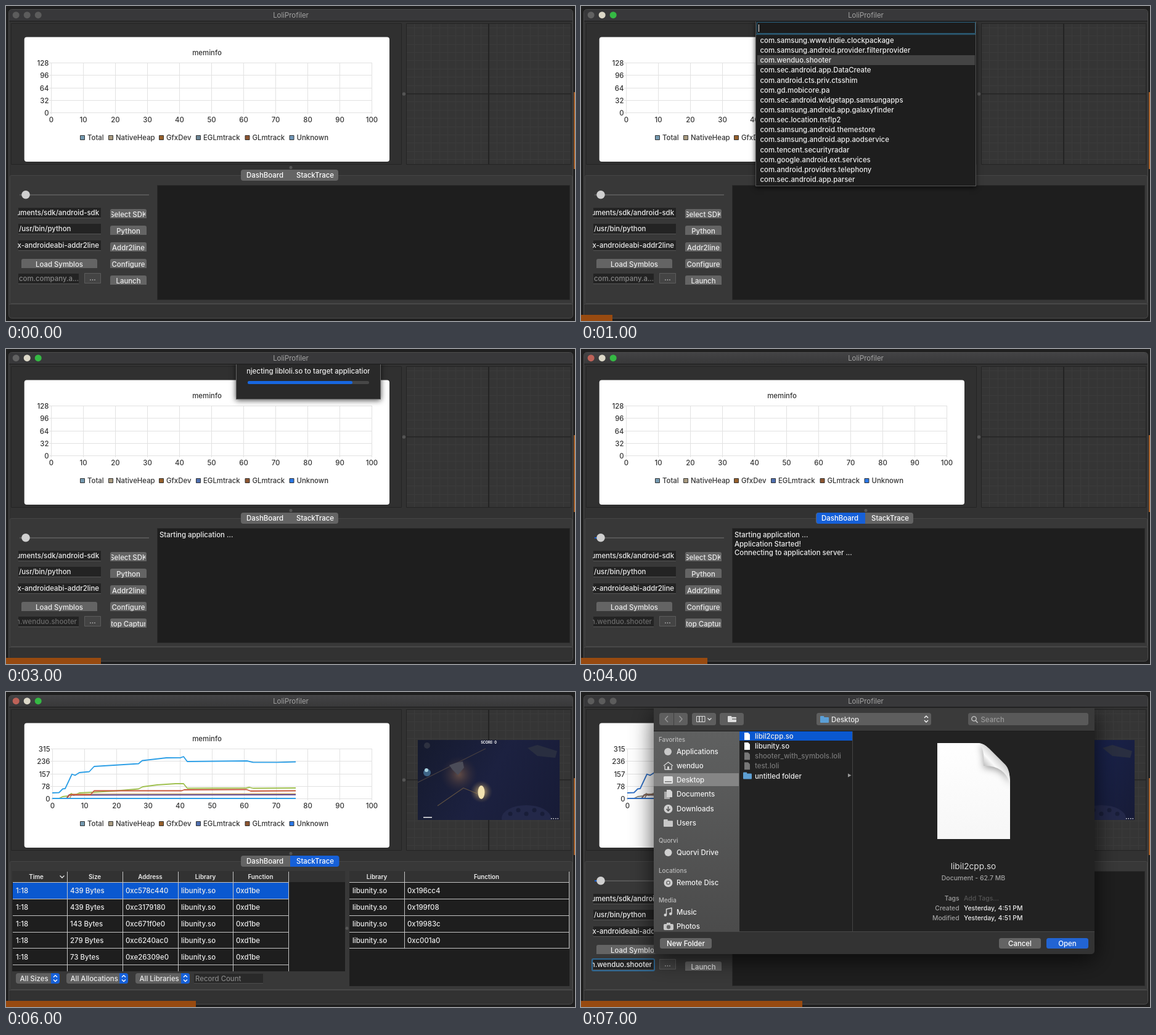
Write an HTML page with a canvas that moves like this. It is 923 px wide and 512 px high and loops after 8000 ms.

```html
<!DOCTYPE html>
<html lang="en">
<head>
<meta charset="utf-8">
<title>Memory profiler session</title>
<style>
html, body { margin: 0; width: 100%; height: 100%; overflow: hidden; background: #202020; }
canvas { display: block; }
</style>
</head>
<body>
<canvas id="stage" width="923" height="512"></canvas>
<script>
const ctx = document.getElementById('stage').getContext('2d');
const BLUE = '#1660d8', ROW_BLUE = '#0a58d0', LIGHT = '#ececec', DARK = '#1e1e1e', GREY = '#646464';
const PACKAGE = 'com.wenduo.shooter';

function rect(x, y, w, h, fill) {
  ctx.fillStyle = fill;
  ctx.fillRect(x, y, w, h);
}
function box(x, y, w, h, r, fill, stroke) {
  ctx.beginPath();
  ctx.roundRect(x, y, w, h, r);
  if (fill) { ctx.fillStyle = fill; ctx.fill(); }
  if (stroke) { ctx.strokeStyle = stroke; ctx.lineWidth = 1; ctx.stroke(); }
}
function ellipse(x, y, rx, ry, fill) {
  ctx.beginPath();
  ctx.ellipse(x, y, rx, ry, 0, 0, 7);
  ctx.fillStyle = fill;
  ctx.fill();
}
const dot = (x, y, r, fill) => ellipse(x, y, r, r, fill);
function trace(points) {
  ctx.beginPath();
  for (let i = 0; i < points.length; i += 2) ctx.lineTo(points[i], points[i + 1]);
}
function line(points, color, width = 1) {
  trace(points);
  ctx.strokeStyle = color;
  ctx.lineWidth = width;
  ctx.lineJoin = 'round';
  ctx.stroke();
}
function shape(points, fill) {
  trace(points);
  ctx.fillStyle = fill;
  ctx.fill();
}
// y is the optical middle of the line
function text(s, x, y, color = LIGHT, align = 'left', size = 11.4, weight = 500) {
  ctx.font = `${weight} ${size}px Inter, "Open Sans", sans-serif`;
  ctx.textAlign = align;
  ctx.fillStyle = color;
  ctx.fillText(s, x, y + size * 0.36);
}
function clipped(x, y, w, h, draw) {
  ctx.save();
  ctx.beginPath();
  ctx.rect(x, y, w, h);
  ctx.clip();
  draw();
  ctx.restore();
}
function shadowed(blur, draw) {
  ctx.save();
  ctx.shadowColor = 'rgba(0,0,0,.7)';
  ctx.shadowBlur = blur;
  ctx.shadowOffsetY = blur / 4;
  draw();
  ctx.restore();
}
function gradient(x0, y0, x1, y1, ...colors) {
  const g = ctx.createLinearGradient(x0, y0, x1, y1);
  colors.forEach((c, i) => g.addColorStop(i / (colors.length - 1), c));
  return g;
}
function glow(x, y, r, inner, outer) {
  const g = ctx.createRadialGradient(x, y, 1, x, y, r);
  g.addColorStop(0, inner);
  g.addColorStop(1, outer);
  rect(x - r, y - r, 2 * r, 2 * r, g);
}

function drawWindow(s) {
  const active = s >= 4 && s < 7;
  rect(0, 0, 923, 512, '#1f1f1f');
  rect(921, 140, 2, 125, '#a9622c');
  box(4.5, 5.5, 915, 502, 5, '#323232', '#4c4c4c');
  box(5, 6, 914, 18, [5, 5, 0, 0], active ? gradient(0, 6, 0, 24, '#434345', '#383839') : '#38383a');
  rect(5, 24, 914, 1, '#1c1c1c');
  const lights = s === 0 || s === 7 ? ['#5c5c5c', '#5c5c5c', '#5c5c5c']
    : [active ? '#bd6258' : '#626262', '#dcd8c8', '#35b944'];
  lights.forEach((c, i) => dot(16.2 + 18 * i, 14.7, 5.5, c));
  text('LoliProfiler', 462, 15, '#a4a4a4', 'center', 11.4, 400);

  box(8.5, 28.5, 633, 229, 0, '#303030', '#242424');
  box(649.5, 28.5, 267, 229, 0, '#353535', '#242424');
  for (let i = -9; i < 10; i++) rect(Math.round(783 + i * 13.4), 29, 1, 228, '#3b3b3b');
  for (let i = -8; i < 9; i++) rect(650, Math.round(142 + i * 13.4), 266, 1, '#3b3b3b');
  rect(782, 29, 2, 228, '#242424');
  rect(650, 142, 266, 1.5, '#242424');
  dot(645.5, 143, 2.7, '#555');
  dot(462, 262.5, 2.5, '#555');

  box(6.5, 275.5, 912, 208, 2, '#383838', '#464646');
  rect(5, 484, 914, 1, '#4b4b4b');
  box(381, 266, 158, 18, 4, GREY);
  if (s === 4 || s === 5) box(382, 266, 79, 18, [4, 0, 0, 4], BLUE);
  if (s === 6) box(461, 266, 79.5, 18, [0, 4, 4, 0], BLUE);
  text('DashBoard', 420, 275, '#fff', 'center');
  text('StackTrace', 501.5, 275, '#fff', 'center');
}

function drawChart(s) {
  const full = s >= 5, left = full ? 75 : 73, step = (593 - left) / 10;
  box(29.7, 50.5, 592.3, 202.5, 4, '#fff');
  text('meminfo', 326, 76, '#333', 'center');
  const labels = full ? [315, 236, 157, 78, 0] : [128, 96, 64, 32, 0];
  labels.forEach((v, i) => {
    const y = Math.round(92 + 20.25 * i) + 0.5;
    line([left - 3, y, 593.5, y], '#e2e2e2');
    text(v, left - 3.5, y, '#333', 'right');
  });
  for (let i = 0; i <= 10; i++) {
    const x = Math.round(left + i * step) + 0.5;
    line([x, 92, x, 176], '#e2e2e2');
    text(i * 10, x, 184.5, '#333', 'center');
  }
  const live = s >= 2;
  [['Total', 120, '#7499b0'], ['NativeHeap', 166, '#a99b80'], ['GfxDev', 248, '#96602c'],
   ['EGLmtrack', 308, live ? '#5070b0' : '#6d8797'], ['GLmtrack', 387.5, '#8d5530'],
   ['Unknown', 459.5, live ? '#2a78e8' : '#6f96b8']].forEach(([name, x, c]) => {
    box(x + 0.5, 210.5, 7, 7, 0, c, '#333');
    text(name, x + 12, 214, '#333');
  });
  if (!full) return;
  const dim = s === 7;
  line([75, 173, 86, 173, 92, 170, 101, 169, 106, 165, 110, 168, 119, 164, 140, 163, 175, 161, 215, 157.5,
    222, 154, 245, 151, 275, 149, 288, 149, 294, 156.5, 390, 156, 395, 155, 401, 156.5, 470, 156],
    dim ? '#8f8c80' : '#9fc04f', 1.8);
  line([75, 173, 103, 173, 107, 166, 470, 165.5], dim ? '#8a7460' : '#c9a25c', 1.6);
  line([75, 173, 98, 173, 102, 167.5, 470, 167], dim ? '#666a80' : '#65529a', 1.8);
  line([75, 173, 99, 173, 103, 167, 137, 167, 143, 160.5, 285, 160.5, 289, 159, 390, 158.5, 397, 161, 470, 160.5],
    dim ? '#86685a' : '#c8583e', 1.8);
  const blue = dim ? '#2e6fc6' : '#2d9fe6';
  line([75, 173, 470, 173], blue, 1.8);
  line([75, 164, 86, 163.5, 92, 157.5, 96, 157, 107, 133.5, 112, 135.5, 119, 131, 135, 129.5, 143, 121,
    215, 116.5, 221, 111.5, 260, 107, 283, 106.8, 288, 105, 294, 113, 340, 112.5, 391, 112, 401, 114.3,
    440, 114.3, 470, 113.5], blue, 1.8);
}

function drawScreenshot(s) {
  clipped(668, 78, 230, 130, () => {
    rect(668, 78, 230, 130, gradient(668, 78, 898, 208, '#151a2e', s === 7 ? '#19234e' : '#1c2140', '#171b36'));
    glow(735, 134, 30, '#5f4a45', 'rgba(50,43,55,0)');
    line([668, 147, 718, 122, 778, 92], '#463f40', 1.2);
    line([700, 185, 742, 156, 764, 165], '#5e5041', 1.2);
    shape([719, 119, 730, 115, 741, 113, 743, 123, 733, 135, 724, 126], '#4b4c58');
    shape([846, 91, 862, 86, 894, 96, 891, 107, 862, 104], '#292e40');
    dot(683, 87, 5, '#2d3140');
    dot(683, 131, 6, '#3d6486');
    dot(682, 127, 3, '#a7d1df');
    glow(771, 162, 18, 'rgba(235,200,130,.8)', 'rgba(120,100,70,0)');
    ellipse(771, 163, 5.5, 11, '#f2e2b0');
    ellipse(844, 205, 40, 21, '#232849');
    for (let i = 0; i < 5; i++) dot(818 + i * 13, 198 - (i % 2) * 6, 3.5, '#181d38');
    rect(677, 203, 14, 1.5, '#eee');
    for (let i = 0; i < 4; i++) rect(884 + i * 3.5, 205, 1.5, 1.5, '#ddd');
    text('SCORE: 0', 783, 82, '#fff', 'center', 5.5, 700);
  });
}

function field(x, y, w, value, color, right) {
  box(x, y, w, 17, 0, '#232323');
  rect(x, y + 16, w, 1, '#555');
  clipped(x - 1, y, w, 17, () =>
    text(value, right ? x + w - 3 : x + 1, y + 8, color, right ? 'right' : 'left'));
}
function cutButton(x, y, w, label) {
  clipped(x, y, w, 15, () => {
    box(x, y, w, 19, 3, GREY);
    clipped(x + 2, y, w - 4, 15, () => text(label, x + w / 2, y + 9.2, LIGHT, 'center'));
  });
}

function drawDashboard(s) {
  rect(22, 306, 210, 2, '#565656');
  if (s >= 4) rect(22, 306, 5, 2, BLUE);
  dot(32, 306.8, 6.8, '#cfcfcf');
  field(20, 328, 134, '/Documents/sdk/android-sdk', LIGHT, true);
  field(20, 354, 134, '/usr/bin/python', LIGHT);
  field(20, 381, 134, 'linux-androideabi-addr2line', LIGHT, true);
  cutButton(25, 411, 123, 'Load Symblos');
  const capturing = s === 3 || s === 4;
  if (s < 2) field(20, 435, 98, 'com.company.a...', '#868686');
  else field(20, 435, 98, PACKAGE, capturing ? '#6b6b6b' : LIGHT, true);
  if (s === 7) {
    ctx.lineWidth = 2;
    ctx.strokeStyle = '#2d6793';
    ctx.beginPath();
    ctx.roundRect(18, 434, 101, 19, 2);
    ctx.stroke();
  }
  box(127.5, 434.5, 26, 16, 0, '#444', '#5c5c5c');
  text('...', 140.5, 442, '#ccc', 'center');
  ['Select SDK', 'Python', 'Addr2line', 'Configure', capturing ? 'Stop Capture' : 'Launch']
    .forEach((label, i) => cutButton(169, 330 + Math.round(i * 26.9), 59, label));

  box(245.5, 291.5, 669, 186, 0, DARK, '#2b2b2b');
  const count = s < 3 || s === 7 ? 0 : s === 3 ? 1 : s === 4 ? 3 : 6;
  ['Starting application ...', 'Application Started!', 'Connecting to application server ...',
   'Captured 189381 records.', 'Error occurred when capturing screenshot ...',
   'Error occurred when capturing screenshot ...'].slice(0, count)
    .forEach((entry, i) => text(entry, 249, 302 + i * 14.4));
}

function table(edges, bottom, headers, rows, selected) {
  const left = edges[0], right = edges[edges.length - 1], grid = '#c4c4c4';
  headers.forEach((h, i) => {
    text(h, (edges[i] + edges[i + 1]) / 2 - (h === 'Time' ? 6 : 0), 300, LIGHT, 'center', 9.8, 600);
  });
  if (selected) rect(left, 310, right - left, 26, ROW_BLUE);
  rect(left, 309, right - left, 1, grid);
  rows.forEach((row, r) => {
    const y = 310 + r * 26.8;
    row.forEach((cell, i) => text(cell, edges[i] + 5, y + 13.2));
    rect(left, Math.round(y + 26), right - left, 1, grid);
  });
  const end = Math.min(bottom, 310 + rows.length * 26.8);
  edges.slice(1).forEach(x => rect(x, 292, 1, (selected ? bottom : end) - 292, grid));
}

function arrows(x, y) {
  line([x - 3, y - 2, x, y - 5, x + 3, y - 2], '#fff', 1.3);
  line([x - 3, y + 2, x, y + 5, x + 3, y + 2], '#fff', 1.3);
}

function drawStackTrace() {
  rect(10, 291, 540, 163, DARK);
  rect(10, 291, 540, 18, '#323232');
  rect(557, 291, 357, 187, DARK);
  rect(557, 291, 357, 18, '#323232');
  const allocations = [['439', '0xc578c440'], ['439', '0xc3179180'], ['143', '0xc671f0e0'],
    ['279', '0xc6240ac0'], ['73', '0xe26309e0']];
  table([11, 99, 189, 279, 368, 458], 454, ['Time', 'Size', 'Address', 'Library', 'Function'],
    allocations.map(([size, address]) => ['1:18', size + ' Bytes', address, 'libunity.so', '0xd1be']), true);
  line([87.5, 298.5, 91, 302, 94.5, 298.5], LIGHT, 1.3);
  table([557, 646, 913], 478, ['Library', 'Function'],
    ['0x196cc4', '0x199f08', '0x19983c', '0xc001a0'].map(f => ['libunity.so', f]), false);
  dot(553, 384, 2.5, '#555');
  [['All Sizes', 16, 71], ['All Allocations', 98, 100], ['All Libraries', 210, 88]].forEach(([label, x, w]) => {
    box(x, 457, w, 17, 4, '#606060');
    text(label, x + 6.5, 465.5);
    box(x + w - 14, 457, 14, 17, [0, 4, 4, 0], BLUE);
    arrows(x + w - 7, 465.5);
  });
  box(305, 458, 112, 16, 0, '#292929');
  rect(305, 473, 112, 1, '#4c4c4c');
  text('Record Count', 307, 466, '#858585');
}

function drawPicker(offset) {
  clipped(270, 25, 390, 290, () => {
    ctx.translate(0, -offset);
    shadowed(8, () => rect(283, 25, 358, 268, '#555'));
    rect(284, 25, 356, 267, DARK);
    box(285.5, 26.5, 354, 18, 0, '#1c1c1c', '#2a627f');
    rect(284, 45, 356, 2, '#294e62');
    rect(288, 30, 1, 12, LIGHT);
    rect(286, 80, 353, 16, '#444');
    ['com.samsung.www.Indie.clockpackage', 'com.samsung.android.provider.filterprovider', PACKAGE,
     'com.sec.android.app.DataCreate', 'com.android.cts.priv.ctsshim', 'com.gd.mobicore.pa',
     'com.sec.android.widgetapp.samsungapps', 'com.samsung.android.app.galaxyfinder',
     'com.sec.location.nsflp2', 'com.samsung.android.themestore', 'com.samsung.android.app.aodservice',
     'com.tencent.securityradar', 'com.google.android.ext.services', 'com.android.providers.telephony',
     'com.sec.android.app.parser'].forEach((name, i) => text(name, 290.5, 56 + i * 16.13));
  });
}

function drawInjecting() {
  clipped(360, 25, 260, 75, () => {
    shadowed(9, () => rect(373, 20, 235, 62, '#656565'));
    rect(374, 25, 233, 56, '#292929');
    clipped(391, 26, 199, 24, () => text('Injecting libloli.so to target application', 490, 36, LIGHT, 'center'));
    box(392, 52, 197, 5, 2.5, '#474747');
    box(392, 52, 170, 5, 2.5, '#1767e0');
  });
}

function folder(x, y, w, h, color) {
  box(x, y, w * 0.45, h * 0.4, 1, color);
  box(x, y + h * 0.18, w, h * 0.82, 1, color);
}
function sheetIcon(x, y, color) {
  shape([x, y, x + 6, y, x + 9, y + 3, x + 9, y + 12, x, y + 12], color);
}

const sidebarIcons = {
  Applications: y => dot(141, y, 6, '#c9c9c9'),
  wenduo: y => {
    line([134, y, 141.5, y - 6, 149, y], '#d4d4d4', 1.4);
    line([136, y, 136, y + 6, 147, y + 6, 147, y], '#d4d4d4', 1.4);
    rect(140, y + 1, 3, 5, '#d4d4d4');
  },
  Desktop: y => {
    box(134, y - 6, 15, 12, 1.5, '#e2e2e2');
    rect(136, y + 2, 11, 1.5, '#777');
  },
  Documents: y => { sheetIcon(135, y - 4, '#aaa'); sheetIcon(139, y - 7, '#d4d4d4'); },
  Downloads: y => {
    dot(141.5, y, 7, '#d0d0d0');
    line([141.5, y - 4, 141.5, y + 3], '#555', 1.6);
    line([138.5, y, 141.5, y + 3.5, 144.5, y], '#555', 1.6);
  },
  Users: y => folder(134, y - 6, 15, 12, '#c8c8c8'),
  'Quorvi Drive': y => dot(141.5, y, 6, '#d0d0d0'),
  'Remote Disc': y => { dot(141.5, y, 7, '#cfcfcf'); dot(141.5, y, 3.5, '#777'); dot(141.5, y, 1.8, '#ddd'); },
  Music: y => {
    line([138.5, y + 4, 138.5, y - 5, 147, y - 7, 147, y + 2], '#d4d4d4', 1.5);
    dot(136.8, y + 4.5, 2.3, '#d4d4d4');
    dot(145.3, y + 2.5, 2.3, '#d4d4d4');
  },
  Photos: y => {
    box(134, y - 4, 16, 10, 2, '#c8c8c8');
    rect(139, y - 6, 6, 3, '#c8c8c8');
    dot(142, y + 1, 3.2, '#666');
  }
};

function drawDocument() {
  ctx.beginPath();
  ctx.moveTo(578, 83);
  ctx.lineTo(646, 83);
  ctx.quadraticCurveTo(654, 84, 662, 92);
  ctx.lineTo(688, 118);
  ctx.quadraticCurveTo(696, 126, 696, 148);
  ctx.lineTo(696, 239);
  ctx.lineTo(578, 239);
  ctx.fillStyle = gradient(578, 83, 600, 239, '#fff', '#f7f7f7');
  ctx.fill();
  ctx.save();
  ctx.clip();
  ctx.beginPath();
  ctx.moveTo(646, 83);
  ctx.quadraticCurveTo(655, 92, 653, 120);
  ctx.quadraticCurveTo(686, 119, 696, 148);
  ctx.quadraticCurveTo(696, 126, 688, 118);
  ctx.lineTo(662, 92);
  ctx.quadraticCurveTo(654, 84, 646, 83);
  ctx.shadowColor = 'rgba(0,0,0,.4)';
  ctx.shadowBlur = 12;
  ctx.shadowOffsetY = 3;
  ctx.fillStyle = gradient(654, 124, 677, 103, '#b4b4b4', '#fafafa', '#c8c8c8');
  ctx.fill();
  ctx.restore();
}

function drawFileDialog() {
  shadowed(36, () => box(118, 26, 715, 400, [0, 0, 5, 5], '#333'));
  // the title bar stays above the sheet's shadow
  rect(118, 26, 715, 37, '#3a3a3a');
  rect(118, 63, 139, 326, gradient(0, 63, 0, 389, '#5f6060', '#4b4b4b'));
  rect(257, 64, 576, 325, '#222');
  rect(118, 63, 715, 1, '#1b1b1b');
  rect(440, 64, 1, 325, '#444');
  rect(118, 389, 715, 1, '#484848');

  [[127, 46], [180, 39], [225, 39], [382, 186]].forEach(([x, w]) => box(x, 34, w, 20, 3.5, '#5e5e5e'));
  box(628, 34, 195, 20, 3.5, '#595959');
  rect(150, 34, 1, 20, '#414141');
  line([141, 39, 136.5, 44, 141, 49], '#999', 1.4);
  line([159.5, 39, 164, 44, 159.5, 49], '#999', 1.4);
  for (let i = 0; i < 3; i++) box(187.5 + i * 4.5, 39.5, 4.5, 9, 0, null, '#ddd');
  line([205.5, 42.5, 208.5, 45.5, 211.5, 42.5], '#ddd', 1.3);
  folder(238, 39, 14, 10, '#ddd');
  line([245, 44, 253, 44], '#5e5e5e', 1.3);
  folder(388, 39, 14, 11, '#5b9fd6');
  text('Desktop', 406, 44.5);
  arrows(560, 44);
  ctx.beginPath();
  ctx.arc(637.5, 43.5, 3.7, 0, 7);
  ctx.strokeStyle = '#ccc';
  ctx.stroke();
  line([640.3, 46.5, 643.5, 50], '#ccc', 1.4);
  text('Search', 648.5, 44.5, '#999');

  rect(118, 132, 138, 21, '#858585');
  [['Favorites', 77], ['Quorvi', 241], ['Locations', 290], ['Media', 338]]
    .forEach(([name, y]) => text(name, 126, y, '#bcbcbc', 'left', 9.8));
  const rows = [97, 120, 143, 166, 190, 213, 261, 310, 358, 381];
  Object.entries(sidebarIcons).forEach(([name, icon], i) => {
    icon(rows[i]);
    text(name, 155, rows[i], '#f2f2f2');
  });

  rect(257, 64, 183, 15, ROW_BLUE);
  ['libil2cpp.so', 'libunity.so', 'shooter_with_symbols.loli', 'test.loli', 'untitled folder'].forEach((name, i) => {
    const y = 72 + i * 16.1, faded = i === 2 || i === 3;
    if (i === 4) folder(263, y - 6, 14, 11, '#5d9fd3');
    else sheetIcon(265, y - 6, faded ? '#777' : '#fff');
    text(name, 282, y, faded ? '#777' : LIGHT);
  });
  shape([433, 132.5, 438.5, 135.5, 433, 138.5], '#999');

  drawDocument();
  text('libil2cpp.so', 636.5, 283, '#dedede', 'center', 13.6, 400);
  text('Document - 62.7 MB', 636.5, 302, '#a2a2a2', 'center', 10.5);
  [['Tags', 'Add Tags...', '#555'], ['Created', 'Yesterday, 4:51 PM', LIGHT], ['Modified', 'Yesterday, 4:51 PM', LIGHT]]
    .forEach(([key, value, color], i) => {
      text(key, 613.5, 335 + i * 16.2, '#a2a2a2', 'right', 10.3);
      text(value, 621, 335 + i * 16.2, color, 'left', 10.5);
    });
  [['New Folder', 128, 84, GREY], ['Cancel', 678, 68, GREY], ['Open', 755, 68, '#2264d2']].forEach(([label, x, w, c]) => {
    box(x, 400, w, 17, 3.5, c);
    text(label, x + w / 2, 408.5, '#fff', 'center');
  });
}

function draw(s) {
  drawWindow(s);
  drawChart(s);
  if (s >= 5) drawScreenshot(s);
  if (s === 6) drawStackTrace();
  else drawDashboard(s);
  if (s === 1) drawPicker(0);
  if (s === 2) drawPicker(130);
  if (s === 3) drawInjecting();
  if (s === 7) clipped(0, 25, 923, 487, drawFileDialog);
  rect(0, 502, Math.round(s * 51.28), 10, '#984a10');
}

let shown = -1;
function tick() {
  const second = Math.floor(performance.now() / 1000) % 8;
  if (second !== shown) draw(shown = second);
  requestAnimationFrame(tick);
}
tick();
</script>
</body>
</html>
```
